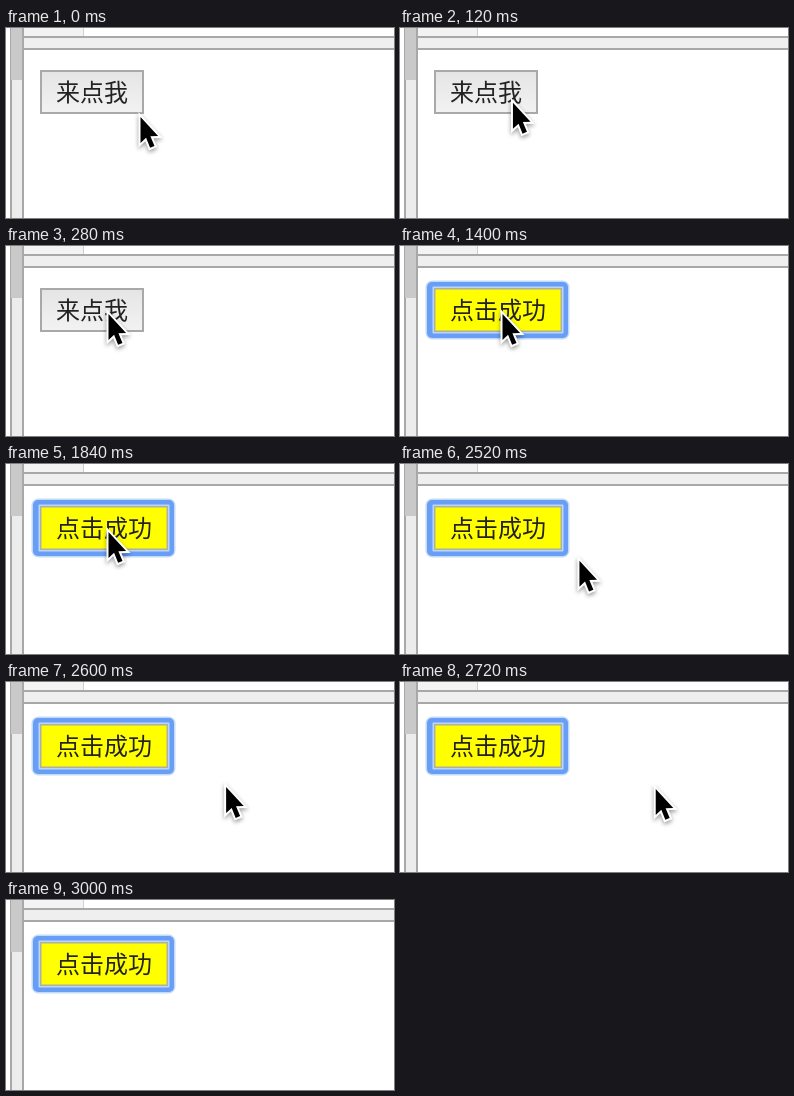
An HTML page with a canvas for the animation above (3960 ms loop, 388x190 px).

```html
<!DOCTYPE html>
<html lang="zh-CN">
<head>
<meta charset="utf-8">
<title>来点我</title>
<style>
html, body { margin: 0; width: 100%; height: 100%; overflow: hidden; background: #fff; }
canvas { display: block; width: 388px; height: 190px; }
</style>
</head>
<body>
<canvas id="stage" width="388" height="190"></canvas>
<script>
const ctx = document.getElementById('stage').getContext('2d');
const LOOP = 3960, STEP = 40, CLICK = 1400;
const ARROW = [[0, 0], [0, 26], [5.6, 20.8], [9.6, 30.8], [14, 29], [9.9, 19.2], [17.6, 19]];

const lerp = (a, b, p) => a + (b - a) * p;
const easeOut = (p, power) => 1 - Math.pow(1 - p, power);

function box(color, x, y, w, h, r = 0) {
  ctx.fillStyle = color;
  ctx.beginPath();
  ctx.roundRect(x, y, w, h, r);
  ctx.fill();
}

function drawPanes() {
  box('#fff', 0, 0, 388, 190);
  // tab strip and horizontal splitter
  box('#f3f3f3', 18, 0, 59, 8);
  box('#cfcfcf', 77, 0, 1, 8);
  box('#a8a8a8', 17, 8, 371, 14);
  box('#efefef', 17, 10, 371, 10);
  // vertical scrollbar
  box('#a8a8a8', 4, 0, 14, 190);
  box('#ececec', 6, 0, 10, 190);
  box('#c9c9c9', 5, 0, 11, 52);
}

function drawLabel(text) {
  ctx.fillStyle = '#222';
  ctx.font = '24px "Noto Sans CJK SC", "Noto Sans CJK", sans-serif';
  ctx.textBaseline = 'alphabetic';
  ctx.fillText(text, 50, 72.5);
}

function drawButton(clicked) {
  if (clicked) {
    box('#c3dafb', 25.5, 34.5, 144, 59, 7);
    box('#689ff5', 27, 36, 141, 56, 5);
    box('#bcd5fa', 32.5, 40.5, 131, 47, 1);
    box('#b0b0a0', 34, 42, 128, 44);
    box('#ffff00', 35.5, 43.5, 125, 41);
    drawLabel('点击成功');
  } else {
    const shade = ctx.createLinearGradient(0, 44, 0, 84);
    shade.addColorStop(0, '#e5e5e5');
    shade.addColorStop(1, '#f2f2f2');
    box('#a9a9a9', 34, 42, 104, 44);
    box(shade, 36, 44, 100, 40);
    drawLabel('来点我');
  }
}

function cursorAt(t) {
  if (t < 2480) {
    const p = easeOut(Math.min(t / 280, 1), 2);
    return [lerp(134.5, 102.5, p), lerp(89, 68, p)];
  }
  if (t < 2960) {
    const p = Math.min((t - 2480) / 320, 1);
    return [lerp(154, 262.5, easeOut(p, 2)), lerp(87, 107, easeOut(p, 5))];
  }
  return t < 3000 ? [319, 2] : null;
}

function drawCursor([x, y]) {
  ctx.save();
  ctx.translate(x, y);
  ctx.beginPath();
  ARROW.forEach(([px, py]) => ctx.lineTo(px, py));
  ctx.closePath();
  ctx.lineWidth = 4;
  ctx.lineJoin = 'miter';
  ctx.miterLimit = 3;
  ctx.strokeStyle = '#fff';
  ctx.shadowColor = 'rgba(0,0,0,.4)';
  ctx.shadowBlur = 4;
  ctx.shadowOffsetY = 2;
  ctx.stroke();
  ctx.shadowColor = 'transparent';
  ctx.fillStyle = '#000';
  ctx.fill();
  ctx.restore();
}

const start = performance.now();

function render() {
  const elapsed = Math.max(0, performance.now() - start) % LOOP;
  const t = Math.floor(elapsed / STEP) * STEP;
  drawPanes();
  drawButton(t >= CLICK);
  const tip = cursorAt(t);
  if (tip) drawCursor(tip);
  requestAnimationFrame(render);
}
render();
</script>
</body>
</html>
```
